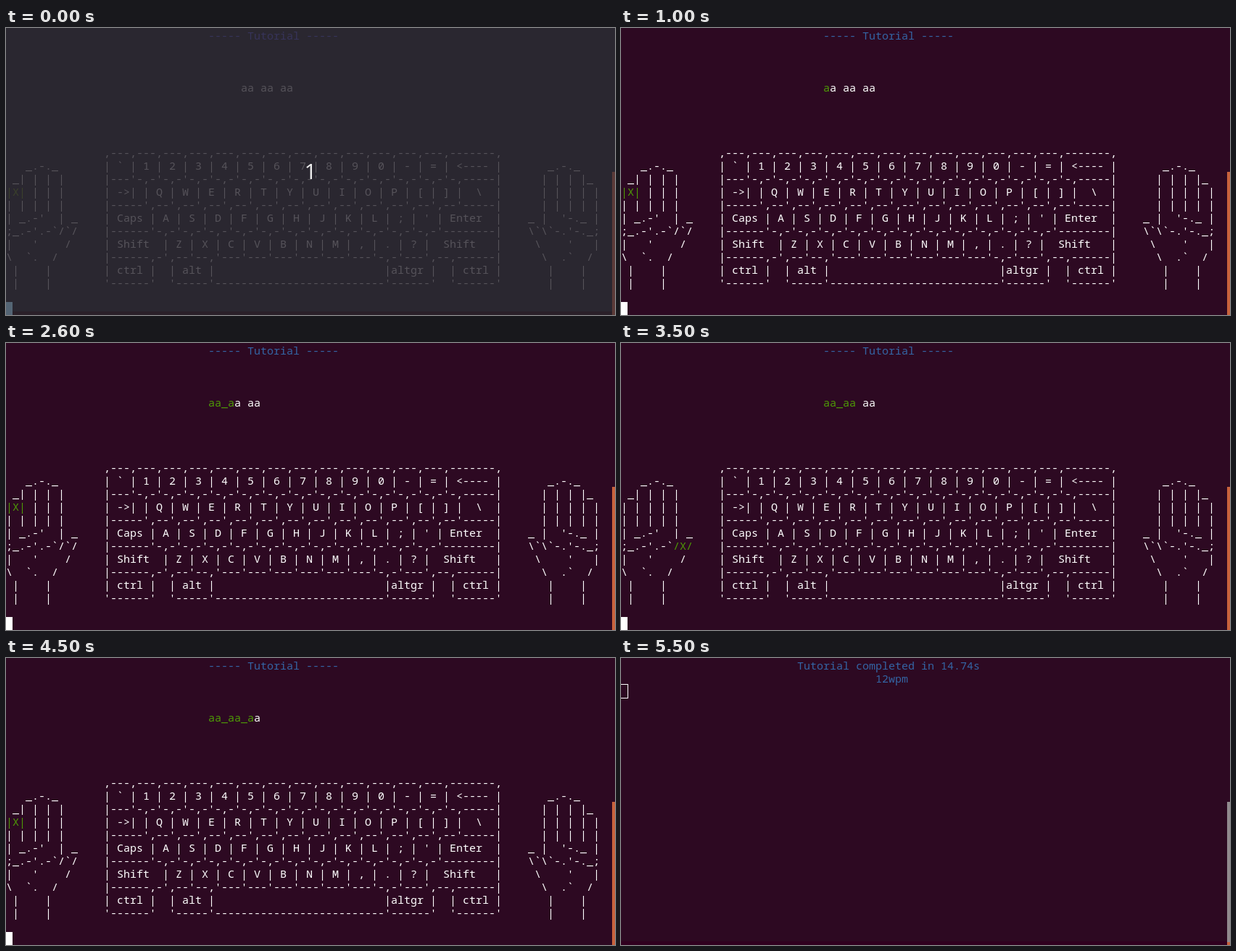
Write an HTML page that moves like this. It is 840x397 px and loops after 5600 ms.

```html
<!DOCTYPE html>
<html lang="en">
<head>
<meta charset="utf-8">
<title>Typing tutorial</title>
<style>
  html, body { margin: 0; width: 100%; height: 100%; overflow: hidden; }
  body {
    --bg: #2d0922; --fg: #fff; --blue: #3465a4; --green: #4e9a06;
    --bar: #c8623c; --cursor: #fff; --strip: #2d0922;
    background: var(--bg);
  }
  body.dim {
    --bg: #2a2730; --fg: #56535a; --blue: #37345a; --green: #3b412c;
    --bar: #5b3a38; --cursor: #546575; --strip: #2a2029;
  }
  body.blur { --bar: #918a8e; --strip: #30001f; }
  #stage {
    position: relative; width: 840px; height: 397px; overflow: hidden;
    background: var(--bg); color: var(--fg);
    font: 15px/18px "Noto Sans Mono", "DejaVu Sans Mono", monospace;
    font-variant-ligatures: none;
  }
  #stage > * { position: absolute; box-sizing: border-box; }
  .text { height: 18px; white-space: pre; }
  .blue { color: var(--blue); }
  .green { color: var(--green); }
  .finger { background: var(--bg); }
  #strip { left: 0; top: 392px; width: 840px; height: 5px; background: var(--strip); }
  #bar { left: 836px; top: 199px; width: 4px; height: 198px; background: var(--bar); }
  #dot { left: 836px; top: 393px; width: 4px; height: 4px; background: #c8623c; }
  #cursor { left: 0; width: 9px; height: 18px; background: var(--cursor); }
  .blur #cursor {
    left: -1px; width: 11px; height: 20px; margin-top: -1px;
    background: none; border: 1px solid #fff;
  }
  #count {
    left: 400px; top: 180px; width: 40px; text-align: center; color: #eee;
    font: 30px/36px "Open Sans", "Noto Sans", sans-serif;
  }
</style>
</head>
<body>
<div id="stage"></div>
<script>
const LOOP = 5600, CELL = 9, LINE = 18;
const PHRASE = "aa aa aa";
const stage = document.getElementById("stage");

function add(id, cls = "") {
  const el = document.createElement("div");
  if (id) el.id = id;
  el.className = cls;
  stage.append(el);
  return el;
}

function text(row, col, str, cls = "") {
  const el = add("", "text " + cls);
  el.style.left = col * CELL + "px";
  el.style.top = 1 + row * LINE + "px";
  el.textContent = str;
  return el;
}

const block = (row, col, lines) => lines.map((s, i) => text(row + i, col, s));
const keys = s => [...s].map(k => "| " + k + " ").join("");
const show = (els, on) => els.forEach(el => el.hidden = !on);

const strip = add("strip");

const keyboard = [
  ",---".repeat(13) + ",-------,",
  keys("`1234567890-=") + "| <---- |",
  "|---" + "'-,-".repeat(12) + "'-,-----|",
  "| ->| " + keys("QWERTYUIOP[]") + "|  \\  |",
  "|-----" + "',--".repeat(12) + "'-----|",
  "| Caps " + keys("ASDFGHJKL;'") + "| Enter  |",
  "|------" + "'-,-".repeat(11) + "'--------|",
  "| Shift  " + keys("ZXCVBNM,.?") + "|  Shift   |",
  "|------,-',--'--," + "'---".repeat(6) + "'-,-'---',--,------|",
  "| ctrl |  | alt |" + " ".repeat(26) + "|altgr |  | ctrl |",
  "'------'  '-----'" + "-".repeat(26) + "'------'  '------'"
];

const leftHand = [
  "   _.-._",
  " _| | | |",
  "| | | | |",
  "| | | | |",
  "| _.-'  | _",
  ";_.-'.-`/`/",
  "|   '    /",
  "\\  `.  /",
  " |    |",
  " |    |"
];

const rightHand = [
  "   _.-._",
  "  | | | |_",
  "  | | | | |",
  "  | | | | |",
  "_ |  '-._ |",
  "\\`\\`-.'-._;",
  " \\    '   |",
  "  \\  .`  /",
  "   |    |",
  "   |    |"
];

const index = text(12, 0, "|X|", "green finger");
const thumb = text(15, 8, "/X/", "green finger");
const lesson = [
  text(0, 31, "----- Tutorial -----", "blue"),
  ...block(9, 15, keyboard),
  ...block(10, 0, leftHand),
  ...block(10, 80, rightHand)
];
stage.append(index, thumb);

const done = text(4, 31, "", "green");
const left = text(4, 36, "");
const result = [
  text(0, 27, "Tutorial completed in 14.74s", "blue"),
  text(1, 39, "12wpm", "blue")
];
const bar = add("bar"), dot = add("dot"), cursor = add("cursor"), count = add("count");
count.textContent = "1";

// start ms, mode, letters typed, cursor visible
const STEPS = [
  [0, "dim", 0, 1],
  [100, "", 0, 0],
  [600, "", 0, 1],
  [1000, "", 1, 1],
  [1200, "", 1, 0],
  [1500, "", 2, 1],
  [1800, "", 2, 0],
  [2000, "", 2, 1],
  [2500, "", 3, 1],
  [2600, "", 4, 1],
  [3500, "", 5, 1],
  [3600, "", 5, 0],
  [4000, "", 6, 1],
  [4300, "", 6, 0],
  [4400, "", 7, 0],
  [4500, "", 7, 1],
  [5000, "", 7, 0],
  [5200, "", 7, 1],
  [5400, "end", 8, 1],
  [5500, "end blur", 8, 1]
];

function draw([, mode, typed, blink]) {
  const ended = mode.startsWith("end");
  const onSpace = PHRASE[typed] === " ";
  document.body.className = mode;
  show([...lesson, done, left], !ended);
  show(result, ended);
  index.hidden = ended || onSpace;
  thumb.hidden = ended || !onSpace;
  done.textContent = PHRASE.slice(0, typed).replaceAll(" ", "_");
  left.textContent = PHRASE.slice(typed);
  left.style.left = (typed ? 31 + typed : 36) * CELL + "px";
  cursor.hidden = !blink;
  cursor.style.top = 1 + (ended ? 2 : 21) * LINE + "px";
  count.hidden = mode !== "dim";
  dot.hidden = mode !== "end blur";
}

let current;
function tick(now) {
  const t = now % LOOP;
  const step = STEPS.findLast(s => s[0] <= t);
  if (step !== current) draw(current = step);
  requestAnimationFrame(tick);
}
tick(0);
</script>
</body>
</html>
```
